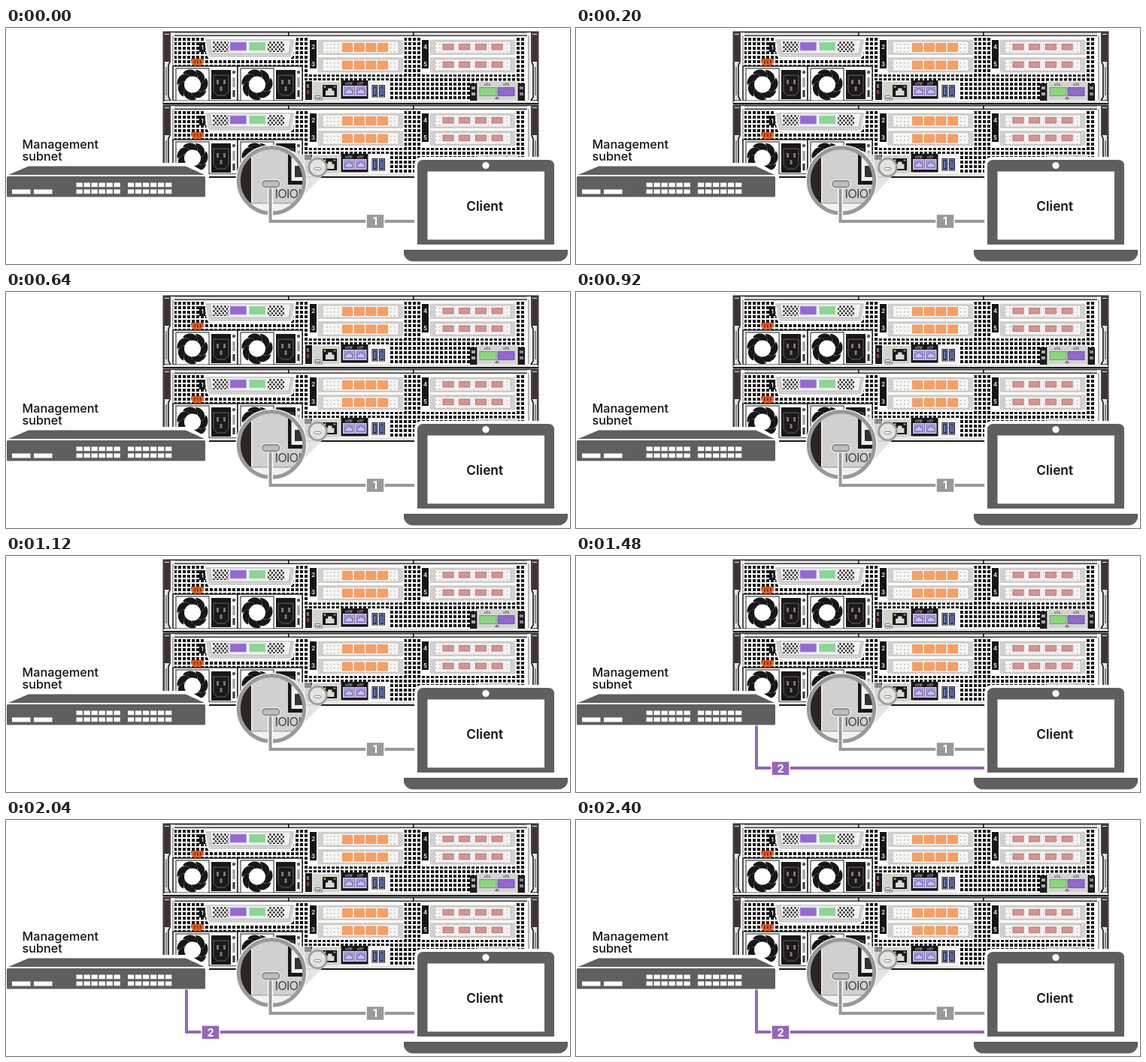
An HTML page for the animation above (2.44 s loop, 750 px wide and 315 px high).

```html
<!DOCTYPE html>
<html lang="en">
<head>
<meta charset="utf-8">
<title>Cabling steps</title>
<style>
  html, body { margin: 0; width: 100%; height: 100%; overflow: hidden; background: #fff; }
  svg { display: block; width: 100vw; height: 100vh; }
  text { font-family: Inter, "Open Sans", sans-serif; }
</style>
</head>
<body>
<svg id="stage" viewBox="0 0 750 315" preserveAspectRatio="none"></svg>
<script>
const LOOP = 2440, STEP_TWO = 1200;
const GRAY = '#999', DARK = '#5f5f5f', PURPLE = '#9467b8', LILAC = '#9368cf', TRAY = '#d2d2d0';

const rect = (x, y, w, h, fill, more = '') =>
  `<rect x="${x}" y="${y}" width="${w}" height="${h}" fill="${fill}" ${more}/>`;
const path = (d, fill, more = '') => `<path d="${d}" fill="${fill}" ${more}/>`;
const line = (d, color, width) => path(d, 'none', `stroke="${color}" stroke-width="${width}"`);
const circle = (x, y, r, fill, more = '') => `<circle cx="${x}" cy="${y}" r="${r}" fill="${fill}" ${more}/>`;
const text = (x, y, size, str, more = '') => `<text x="${x}" y="${y}" font-size="${size}" ${more}>${str}</text>`;
const repeat = (n, fn) => Array.from({ length: n }, (_, i) => fn(i)).join('');

const pattern = (id, w, h, shape) =>
  `<pattern id="${id}" width="${w}" height="${h}" patternUnits="userSpaceOnUse">${shape}</pattern>`;

const defs = `<defs>
  ${pattern('holes', 6, 6, rect(1, 1, 4, 4, '#151515'))}
  ${pattern('mesh', 5, 6, circle(1.4, 1.5, 1.4, '#333') + circle(3.9, 4.5, 1.4, '#333'))}
  ${pattern('specks', 5, 5, rect(1, 1, 1.4, 1.4, '#b5aaa2'))}
  <clipPath id="lens">${circle(353, 203.5, 43, '#000')}</clipPath>
</defs>`;

function fan(cx, cy) {
  const blades = repeat(7, i =>
    path('M6 -9C8 -14 5 -19 -2 -20C-8 -20 -11 -18 -13 -15C-8 -14 -4 -13 -3 -10Z', '#171717',
      `transform="rotate(${i * 360 / 7})"`));
  return `<g transform="translate(${cx} ${cy})">${rect(-22, -21.5, 44, 43, '#fff', 'stroke="#222" stroke-width="1"')}
    ${blades}${circle(0, 0, 11, '#fff')}</g>`;
}

function supply(x) {
  return rect(x, 51, 86, 46, '#f6f6f4', 'stroke="#1b1b1b" stroke-width="1.4"') + fan(x + 26, 75.5)
    + rect(x + 51, 56, 26, 39, '#181818')
    + path(`M${x + 54} 63h20v22l-5 5h-10l-5 -5z`, '#1c191a', 'stroke="#6b5c60" stroke-width="1"')
    + rect(x + 58, 69, 3, 6, '#777') + rect(x + 67, 69, 3, 6, '#777') + rect(x + 62.5, 78, 3, 6, '#777')
    + circle(x + 81, 59, 2.2, '#555') + rect(x + 79.5, 66, 3, 13, '#9a9a98')
    + rect(x + 79.5, 83, 3, 9, '#333');
}

function tag(x, top, bottom) {
  const label = (y, n) => text(x + 4.5, y, 7.5, n, 'fill="#fff" text-anchor="middle" font-weight="600"');
  return rect(x, 16, 9, 38, '#161616') + label(27.5, top) + label(50.5, bottom);
}

function tray(x, y, ports) {
  return rect(x, y, 115, 21.5, TRAY, 'rx="2" stroke="#fff" stroke-width="1"')
    + rect(x + 7, y + 3, 101, 16, '#f6f5f3', 'stroke="#aaa" stroke-width=".6"')
    + rect(x + 8, y + 4, 99, 14, 'url(#specks)') + ports;
}

function orangePorts(y) {
  return repeat(4, i => rect(446 + i * 15.7, y + 4, 15.7, 14, '#f6efe9')
    + rect(447.5 + i * 15.7, y + 5.5, 13, 11, '#f99f60', 'stroke="#e88745" stroke-width=".6"'));
}

function pinkPorts(y) {
  return repeat(4, i => rect(578 + i * 21.7, y + 4, 20, 13, '#f1ecea')
    + rect(581 + i * 21.7, y + 6.5, 14, 7.5, '#d59492', 'stroke="#a96363" stroke-width=".7"'));
}

function jack(x) {
  return rect(x, 77.5, 14.5, 13, '#a898dc', 'stroke="#ded7f3" stroke-width="1"')
    + path(`M${x + 2.5} 88v-5h3v-2h4v2h3v5z`, '#c9bdf0', 'stroke="#65539e" stroke-width=".8"');
}

function slotOne() {
  return path('M264 14H385L381 36Q380 40 375 40H274Q269 40 268 36Z', TRAY, 'stroke="#fff" stroke-width="2"')
    + path('M271 16H379L376 34H274Z', '#f2f2f0', 'stroke="#aaa" stroke-width=".7"')
    + rect(275, 18, 21, 14, 'url(#mesh)') + rect(348, 18, 22, 14, 'url(#mesh)')
    + rect(298, 19, 21.5, 11, LILAC, 'stroke="#b79be4" stroke-width="1"')
    + rect(323.5, 19, 21.5, 11, '#8bd694', 'stroke="#b5e6ba" stroke-width="1"')
    + rect(257, 19, 8, 13, '#161616')
    + text(261, 28.5, 7.5, '1', 'fill="#fff" text-anchor="middle" font-weight="600"')
    + path('M246 41H263V46L259 50H250L246 46Z', '#e45b1c')
    + repeat(3, i => rect(250 + i * 4, 43, 1.5, 4, '#7c2a08'));
}

function ioPanel() {
  const usb = x => rect(x, 76.5, 7, 15.5, '#ddd', 'stroke="#222" stroke-width="1"')
    + rect(x + 1, 77.5, 5, 13.5, '#253672') + rect(x + 2.7, 79.5, 1.5, 9.5, '#8796cf');
  return rect(396, 70, 113, 27, '#f4f4f2') + rect(398, 71, 9, 25, '#1c1c1c')
    + rect(400, 75, 3, 5, '#7a7a7a') + rect(400, 83, 3, 5, '#9b3b30')
    + rect(408, 72, 36, 24, TRAY) + rect(411, 90.5, 7, 2.5, '#fff', 'rx="1" stroke="#555" stroke-width=".8"')
    + text(411, 96.5, 4.5, 'IOIOI', 'fill="#444"')
    + rect(421, 76, 19, 16, '#171717')
    + path('M425 90V83.5H428V80.5H433.5V83.5H436.5V90Z', '#d9d9d6')
    + rect(422.5, 77.5, 3, 2, '#dfca51') + rect(435.5, 77.5, 3, 2, '#7eb76b')
    + rect(445.5, 70, 36, 24.5, '#181818')
    + text(451, 75.5, 4.5, 'e0M', 'fill="#ddd"') + text(467, 75.5, 4.5, 'e0P', 'fill="#ddd"')
    + jack(448.5) + jack(464.5)
    + usb(487) + usb(496.5);
}

function rightPanel() {
  return rect(617, 74, 73, 23, '#1c1c1c') + repeat(2, i => rect(619, 78 + i * 8, 5, 4, '#aaa'))
    + rect(627, 71, 53, 26, TRAY, 'stroke="#fff" stroke-width="1"')
    + text(636, 77, 4.5, 'e0a', 'fill="#333"') + text(661, 77, 4.5, 'e0b', 'fill="#333"')
    + rect(630, 79.5, 22, 11, '#8bd680', 'stroke="#5d9e55" stroke-width=".8"')
    + rect(654, 79.5, 22, 11, LILAC, 'stroke="#6d4ba4" stroke-width=".8"')
    + path('M650 95L653 92L656 95M653 92V96', 'none', 'stroke="#333" stroke-width=".8"')
    + repeat(2, i => rect(683, 78 + i * 8, 5, 4, '#888'));
}

function ear(x) {
  return rect(x, 6, 15, 92, '#f4f4f2')
    + path(`M${x + 1} 7H${x + 9}V45L${x + 7} 50V92L${x + 10} 97H${x + 1}Z`, '#e4e2e0', 'stroke="#1a1a1a" stroke-width="1.6"')
    + rect(x + 2, 9, 6, 36, '#3d3231') + rect(x + 3, 52, 2, 38, '#8a8583')
    + rect(x + 12.5, 10, 1, 86, '#777');
}

function chassis(y) {
  const trays = [15, 38.5].map(ty => tray(414, ty, orangePorts(ty)) + tray(563, ty, pinkPorts(ty))).join('');
  return `<g transform="translate(0 ${y})">
    ${rect(209, 5, 499, 96, '#fff', 'stroke="#333" stroke-width="1"')}
    ${rect(223, 12, 468, 84, 'url(#holes)')}
    ${rect(209, 5, 499, 5.5, '#e3e3e1')}${rect(209, 5, 499, 1.3, '#222')}${rect(217, 9.6, 483, 1.3, '#222')}
    ${[375, 541].map(x => rect(x, 5, 1.5, 6, '#111')).join('')}
    ${ear(209)}<g transform="translate(917 0) scale(-1 1)">${ear(209)}</g>
    ${slotOne()}${supply(222)}${supply(308)}
    ${rect(402, 13, 127.5, 49, '#fff')}${rect(551, 13, 128, 49, '#fff')}
    ${tag(404, 2, 3)}${tag(553, 4, 5)}${trays}
    ${ioPanel()}${rightPanel()}
    ${rect(211, 97, 495, 4, '#e3e3e1')}${rect(209, 100, 499, 2, '#1a1a1a')}
  </g>`;
}

function networkSwitch() {
  const ports = x => repeat(12, i => rect(x + (i % 6) * 10, i < 6 ? 206.5 : 215.5, 8.3, 5.7, '#fff'));
  return path('M29 180H242L270 195V231H0V195Z', '#fff')
    + path('M30 184.5H239L264 196H3Z', DARK)
    + rect(1, 198, 264, 27.5, DARK, 'rx="1.5"')
    + rect(8, 215.5, 24.5, 6, '#fff') + rect(37, 215.5, 24.5, 6, '#fff')
    + ports(93.5) + ports(162);
}

function magnifier() {
  return path('M371 161L411 174L422 196L390 230Z', '#e2e2e2', 'opacity=".92"')
    + rect(397, 169, 9, 7, '#8c8c8c')
    + circle(414.5, 186, 11.8, '#e3e3e2', `stroke="${GRAY}" stroke-width="2.5"`)
    + rect(410, 186.5, 9, 3, '#fff', 'rx="1.5" stroke="#888" stroke-width="1"')
    + circle(353, 203.5, 47.5, '#fff')
    + `<g clip-path="url(#lens)">
        ${rect(305, 155, 95, 95, '#d0d0ce')}${rect(305, 155, 21, 80, '#2b2523')}
        ${rect(326, 155, 1.5, 80, '#f4f4f2')}${rect(305, 234, 95, 16, '#f1f1ef')}
        ${rect(305, 233, 95, 1.5, '#aaa')}
        ${rect(375, 155, 25, 54, '#181818')}${rect(379.5, 159, 21, 45, '#f2f2f0')}
        ${path('M384 199V184H389V176H400V199Z', '#333')}
        ${text(357.5, 226.5, 16.5, 'IOIOI', 'fill="#444" font-weight="400" letter-spacing="-.8"')}
      </g>`
    + circle(353, 203.5, 43.7, 'none', `stroke="${GRAY}" stroke-width="5"`);
}

function laptop() {
  return rect(543, 172, 190, 124, '#fff', 'rx="10"')
    + path('M525 292H750V315H525Z', '#fff')
    + path('M547 289V184Q547 176 555 176H721Q729 176 729 184V289Z', DARK)
    + rect(560.5, 191.5, 155.5, 91, '#fff')
    + circle(638, 183.5, 4.6, '#fff')
    + path('M529 296H747V302Q744 311.5 734 311.5H542Q532 311.5 529 302Z', DARK)
    + text(636.7, 244.3, 17.3, 'Client', 'fill="#111" font-weight="600" text-anchor="middle"');
}

function badge(x, y, n, color) {
  return rect(x, y, 24, 19, color, 'stroke="#fff" stroke-width="1.5"')
    + text(x + 12, y + 14.7, 14.5, n, 'fill="#fff" font-weight="700" text-anchor="middle"');
}

const cableOne = line('M351.5 210V258H544', '#fff', 7) + line('M351.5 210V258H544', GRAY, 4)
  + rect(339, 202, 26.5, 12.5, '#f4f4f2', 'rx="6"')
  + rect(341, 204, 22.5, 8.5, '#bdbdbb', 'rx="4" stroke="#8c8c8c" stroke-width="1.8"')
  + badge(479, 248.5, 1, GRAY);

const cableTwo = `<g id="cableTwo" opacity="0">${line('M240 226.5V283H544', PURPLE, 4)}${badge(260, 274, 2, PURPLE)}</g>`;

const titles = ['Management', 'subnet'].map((s, i) =>
  text(21.5, 161 + i * 16, 16.2, s, 'fill="#111" font-weight="500"')).join('');

document.getElementById('stage').innerHTML = defs + chassis(0) + chassis(98)
  + networkSwitch() + magnifier() + cableOne + cableTwo + laptop() + titles;

const cut = STEP_TWO / LOOP;
document.getElementById('cableTwo').animate([
  { opacity: 0, offset: 0 },
  { opacity: 0, offset: cut },
  { opacity: 1, offset: cut },
  { opacity: 1, offset: 1 }
], { duration: LOOP, iterations: Infinity });
</script>
</body>
</html>
```
